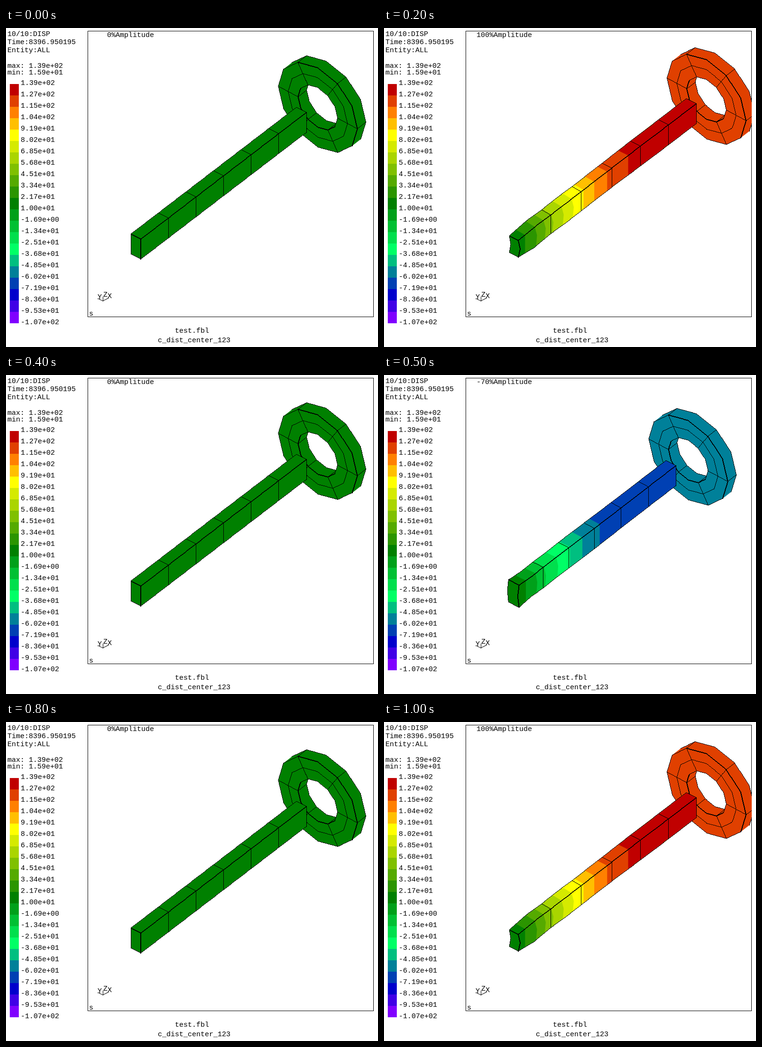
Animation, 784 px wide and 672 px high, one loop 1100 ms. Source, as an HTML page with a canvas:

```html
<!DOCTYPE html>
<html lang="en">
<head>
<meta charset="utf-8">
<title>Displacement animation</title>
<style>
  html, body { margin: 0; width: 100%; height: 100%; overflow: hidden; background: #fff; }
  canvas { display: block; }
</style>
</head>
<body>
<canvas id="stage" width="784" height="672"></canvas>
<script>
const ctx = document.getElementById('stage').getContext('2d');
const STEP_MS = 100, STEPS = 11;
const REST = 15.9, TOP = 138.69, BAND = 11.698, BANDS = 21;
const RING_VALUE = 120;

// Displacement along the bar: [element position, value]
const PROFILE = [[0, 15.9], [.2, 21.7], [.27, 24.2], [.57, 33.4], [.75, 41], [.84, 45.1],
  [1.09, 57], [1.59, 74.4], [2.05, 91], [2.55, 107.8], [2.85, 115.3], [3.24, 124.5],
  [3.58, 127.1], [6, 138.6]];

// Long bar edges: offset, node shifts at full amplitude, mid-node bow of the first elements
const EDGES = {
  back: { at: [-21, -11], dx: [1, 11, 17, 22, 24, 25, 25], dy: [4, -6.5, -11, -15.5, -18, -18.5, -18.5], bow: [-3, -1] },
  top: { at: [0, 0], dx: [-1, 9, 15, 21.5, 24, 25, 25], dy: [3, -6.5, -11, -16.5, -18.5, -18.5, -18.5], bow: [-1.5, 0] },
  low: { at: [0, 42], dx: [-1, 9, 15, 21.5, 24, 25, 25], dy: [-4, -9, -12.5, -18, -18.5, -18.5, -18.5], bow: [4, 1] }
};

const mix = (a, b, t) => a + (b - a) * t;
const mid = (p, q, t = .5) => [mix(p[0], q[0], t), mix(p[1], q[1], t)];
const range = (a, b) => Array.from({ length: b - a + 1 }, (_, i) => a + i);

function bandColor(i) {
  const k = BANDS - 1 - i;
  const ramp = (pts) => {
    let j = 1;
    while (k > pts[j][0]) j++;
    const [a, x] = pts[j - 1], [b, y] = pts[j];
    return Math.round(mix(x, y, (k - a) / (b - a)));
  };
  const r = ramp([[0, 128], [2, 0], [10, 0], [16, 255], [18, 255], [20, 192]]);
  const g = ramp([[0, 0], [2, 0], [6, 255], [10, 128], [16, 255], [20, 0]]);
  const b = ramp([[0, 255], [10, 0], [20, 0]]);
  return `rgb(${r},${g},${b})`;
}

function bandOf(value, amp) {
  const v = REST + amp * (value - REST);
  return Math.max(0, Math.min(BANDS - 1, Math.floor((TOP - v) / BAND)));
}

function profile(u) {
  let j = 1;
  while (j < PROFILE.length - 1 && u > PROFILE[j][0]) j++;
  const [a, x] = PROFILE[j - 1], [b, y] = PROFILE[j];
  return mix(x, y, (u - a) / (b - a));
}

function path(pts) {
  ctx.beginPath();
  pts.forEach(([x, y]) => ctx.lineTo(x, y));
  ctx.closePath();
}

function fill(pts, color) {
  ctx.fillStyle = color;
  path(pts);
  ctx.fill();
}

// Hard-edged polyline, plotted pixel by pixel and centred on its path
function line(pts, w = 1) {
  ctx.fillStyle = '#000';
  const off = (w - 1) / 2;
  for (let s = 1; s < pts.length; s++) {
    const [p, q] = [pts[s - 1], pts[s]];
    const dx = Math.abs(q[0] - p[0]), dy = Math.abs(q[1] - p[1]);
    const steep = dx < dy;
    const n = Math.max(1, Math.ceil(Math.max(dx, dy)));
    for (let i = 0; i <= n; i++) {
      const [x, y] = mid(p, q, i / n);
      if (steep) ctx.fillRect(Math.floor(x - off), Math.floor(y), w, 1);
      else ctx.fillRect(Math.floor(x), Math.floor(y - off), 1, w);
    }
  }
}

function text(s, x, y) {
  ctx.fillStyle = '#000';
  ctx.fillText(s, x, y);
}

function drawRing(amp) {
  const cx = 657.2 + 22.5 * amp, cy = 167.4 - 17 * amp;
  const front = (n, s = 1) => {
    const c = Math.cos(n * Math.PI / 6) * s, d = Math.sin(n * Math.PI / 6) * s;
    return [cx - 42 * c + 72 * d, cy - 95 * c - 3 * d];
  };
  const back = (n, s = 1) => {
    const [x, y] = front(n, s);
    return [x + 18, y - 14];
  };
  const arc = (f, a, b, s) => range(a, b).map(n => f(n, s));
  const color = bandColor(bandOf(RING_VALUE, amp));

  fill([...arc(back, -1, 5), ...arc(front, 5, 11)], color);

  ctx.save();
  path(arc(front, 0, 11, .5));
  ctx.clip();
  fill(arc(back, 0, 11, .5), '#fff');
  line(arc(back, 5, 11, .5));
  for (const n of [6, 8, 10]) line([front(n, .5), back(n, .5)]);
  ctx.restore();

  line(arc(back, -1, 5));
  line(arc(front, 5, 12));
  line(arc(front, 0, 5), 2);
  line(arc(front, 0, 12, .75));
  line(arc(front, -1, 5, .5));
  line(arc(front, 5, 11, .5), 2);
  for (const n of [0, 2, 4, 6, 8, 10]) line([front(n), front(n, .5)]);
  for (const n of [0, 2, 4]) line([front(n), back(n)]);
}

function edgePoints(e, amp) {
  const node = i => [284 + 58.17 * i + e.at[0] + e.dx[i] * amp,
    445 - 44.5 * i + e.at[1] + e.dy[i] * amp];
  return range(0, 12).map(h => {
    const i = h >> 1;
    if (h % 2 === 0) return node(i);
    const [x, y] = mid(node(i), node(i + 1));
    return [x, y + (e.bow[i] || 0) * amp];
  });
}

function pointAt(pts, u) {
  const i = Math.min(11, Math.floor(u * 2));
  return mid(pts[i], pts[i + 1], u * 2 - i);
}

function drawBar(amp) {
  const A = edgePoints(EDGES.back, amp);
  const B = edgePoints(EDGES.top, amp);
  const C = edgePoints(EDGES.low, amp);
  const D0 = [263 + amp, 476 - 3 * amp];
  const bulge = (p, q, d) => {
    const [x, y] = mid(p, q);
    return [x + d * amp, y];
  };
  const midBC = bulge(B[0], C[0], 4), midAD = bulge(A[0], D0, 3);
  const tail = (pts, u) => [pointAt(pts, u), ...pts.filter((_, h) => h / 2 > u)];

  fill([A[0], B[0], midBC, C[0], D0, midAD], bandColor(bandOf(REST, amp)));

  // Each band is painted to the far end; the next one covers it.
  let last = -1;
  for (let s = 0; s <= 600; s++) {
    const u = s / 100, band = bandOf(profile(u), amp);
    if (band === last) continue;
    last = band;
    const curved = u > .4 && u < 1.8;
    const uB = curved ? u - .07 : u, uC = curved ? u - .03 : u;
    const m = s ? mid(pointAt(B, u), pointAt(C, u)) : midBC;
    const color = bandColor(band);
    fill([...tail(A, uB), ...tail(B, uB).reverse()], color);
    fill([...tail(B, uB), ...tail(C, uC).reverse(), m], color);
  }

  line(A);
  line(B, 2);
  line(C);
  for (let h = 2; h <= 12; h += 2) line([A[h], B[h], C[h]]);
  line([A[0], B[0]], 2);
  line([B[0], midBC, C[0]], 2);
  line([A[0], midAD, D0, C[0]]);
}

function label(v) {
  const [m, e] = v.toExponential(2).split('e');
  return m + 'e' + e[0] + e.slice(1).padStart(2, '0');
}

function drawLegend() {
  text('10/10:DISP', 3, 17);
  text('Time:8396.950195', 3, 34);
  text('Entity:ALL', 3, 51);
  text('max: 1.39e+02', 3, 84);
  text('min: 1.59e+01', 3, 98);
  for (let i = 0; i < BANDS; i++) {
    ctx.fillStyle = bandColor(i);
    ctx.fillRect(8, 118 + 24 * i, 19, 24);
  }
  for (let i = 0; i <= BANDS; i++) text(label(TOP - BAND * i), 31, 120 + 24 * i);
  text('test.fbl', 356, 642);
  text('c_dist_center_123', 320, 662);
}

function drawAxes() {
  line([[193, 570], [204, 575], [215, 569]]);
  line([[204, 575], [204, 566]]);
  text('Y', 193, 571);
  text('Z', 205, 566);
  text('X', 214, 569);
}

function draw(step) {
  const amp = Math.sin(step * Math.PI / 4);
  ctx.fillStyle = '#fff';
  ctx.fillRect(0, 0, 784, 672);
  ctx.font = '15px "Liberation Mono", "DejaVu Sans Mono", monospace';
  drawLegend();
  ctx.strokeStyle = '#000';
  ctx.lineWidth = 1;
  ctx.strokeRect(172.5, 6.5, 602, 602);
  text('s', 175, 606);
  drawAxes();
  const title = Math.trunc(amp * 100) + '%Amplitude';
  text(title, 312 - 9 * title.length, 19);

  ctx.save();
  ctx.beginPath();
  ctx.rect(172, 6, 603, 603);
  ctx.clip();
  // A hair of offset keeps resting nodes on their pixel despite rounding.
  const pose = Math.abs(amp) < 1e-9 ? 0 : amp;
  drawRing(pose);
  drawBar(pose);
  ctx.restore();
}

const start = performance.now();
let shown = 0;
function tick() {
  const step = Math.floor((performance.now() - start) / STEP_MS) % STEPS;
  if (step !== shown) draw(shown = step);
  requestAnimationFrame(tick);
}
draw(0);
requestAnimationFrame(tick);
</script>
</body>
</html>
```
